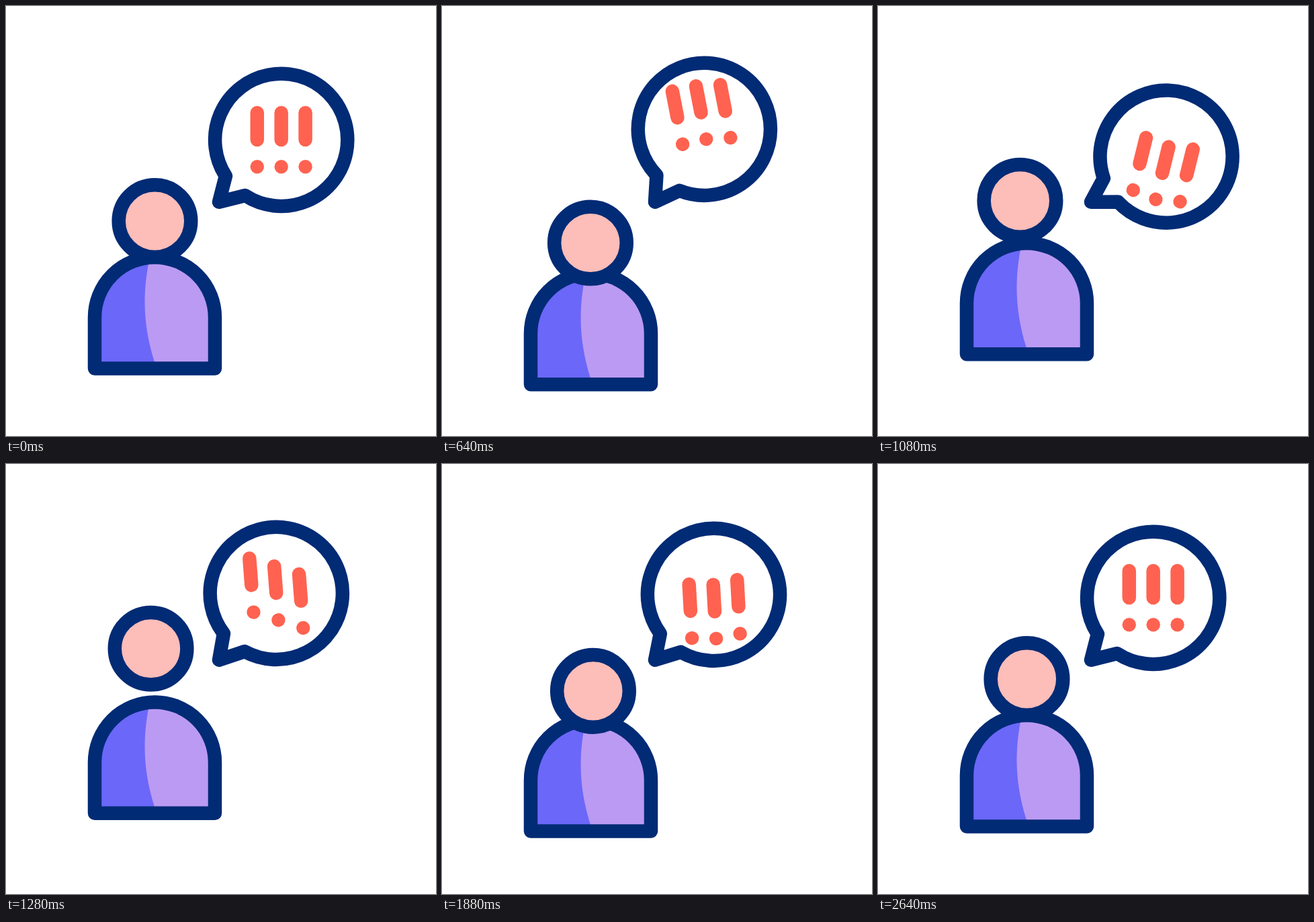
Write an HTML page that moves like this. It is 640x640 px and loops after 3 s.

```html
<!DOCTYPE html>
<html lang="en">
<head>
<meta charset="utf-8">
<title>Exclaiming person</title>
<style>
  html, body { margin: 0; width: 100%; height: 100%; overflow: hidden; background: #fff; }
  svg { display: block; width: 100%; height: 100%; }
  .line { fill: none; stroke: #022b75; stroke-width: 20.5; stroke-linejoin: round; }
</style>
</head>
<body>
<svg viewBox="0 0 640 640">
  <g id="bubble">
    <path class="line" d="M327 253A98.6 98.6 0 1 1 356 282L317 291.7Z"/>
    <g id="marks" fill="#ff6250" stroke="#ff6250" stroke-linecap="round"></g>
  </g>
  <g id="body">
    <path fill="#6b67f9" d="M132 539.4V463.5a89.5 89.5 0 0 1 179 0V539.4Z"/>
    <path fill="#bb9af3" d="M214 374C203 425 203 475 222 533V539.4H311V463.5A89.5 89.5 0 0 0 221.5 374Z"/>
    <path class="line" d="M132 539.4V463.5a89.5 89.5 0 0 1 179 0V539.4Z"/>
  </g>
  <g id="head">
    <circle class="line" cx="221.5" cy="320" r="53.8" style="fill:#fdbdb9"/>
  </g>
</svg>
<script>
const LOOP = 3000, STEP = 40, UNIT = 25.6;

// Tracks are [time, value] keys joined by smooth easing.
const tilt = [[200, 0], [640, -11], [1000, 18], [1290, -4.5], [1580, 6.6], [1860, -3.2], [2140, 0]];
const bodyY = [[200, 0], [720, UNIT], [1160, -UNIT], [1640, UNIT / 2], [2120, 1.28], [2640, 0]];
const headY = [[320, 0], [840, UNIT / 2], [1280, -UNIT], [1760, UNIT / 2], [2240, 0]];
const headX = [[560, 0], [1120, -10.2], [1640, 8.8], [2060, 0]];
const markY = [[200, 0], [600, -UNIT], [1000, UNIT], [1400, -UNIT], [1800, UNIT], [2200, 0]];
const MARK_DELAY = 80;

function sample(track, t) {
  const next = track.findIndex(([time]) => time > t);
  if (next === 0) return track[0][1];
  if (next < 0) return track[track.length - 1][1];
  const [t0, a] = track[next - 1], [t1, b] = track[next];
  const p = (t - t0) / (t1 - t0);
  return a + (b - a) * p * p * (3 - 2 * p);
}

const byId = id => document.getElementById(id);
const bubble = byId('bubble'), body = byId('body'), head = byId('head'), marks = byId('marks');
const move = (el, x, y) => el.setAttribute('transform', `translate(${x} ${y})`);

marks.innerHTML = [373.8, 409.7, 445.6].map(x =>
  `<g><path stroke-width="20.5" d="M${x} 159V199"/><circle cx="${x}" cy="239.3" r="10.2" stroke="none"/></g>`).join('');

function draw(now) {
  const t = Math.floor((now % LOOP) / STEP) * STEP;
  const y = sample(bodyY, t);
  move(body, 0, y);
  move(head, sample(headX, t), y + sample(headY, t));
  bubble.setAttribute('transform', `rotate(${sample(tilt, t)} 317 291.7)`);
  [...marks.children].forEach((mark, i) => move(mark, 0, sample(markY, t - i * MARK_DELAY)));
}

const start = performance.now();
function frame() {
  draw(performance.now() - start);
  requestAnimationFrame(frame);
}
frame();
</script>
</body>
</html>
```
